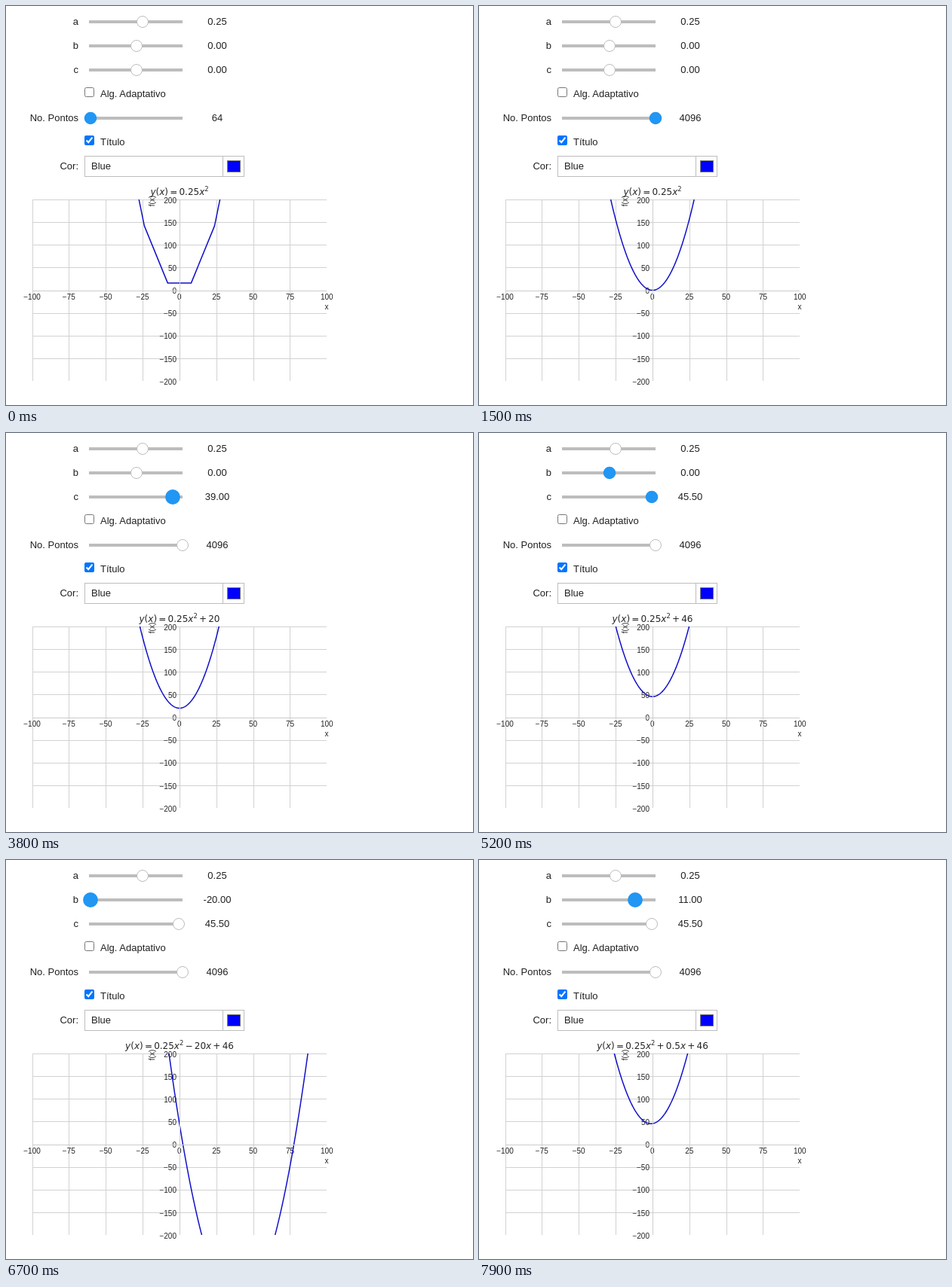
An HTML page for the animation above (8 s loop, 619x530 px).

```html
<!DOCTYPE html>
<html lang="pt">
<head>
<meta charset="utf-8">
<title>Parábola</title>
<style>
  html, body { margin: 0; width: 100%; height: 100%; overflow: hidden; background: #fff; }
  svg { position: absolute; left: 0; top: 0; }
  input { position: absolute; left: 104px; margin: 0; width: 13px; height: 13px; pointer-events: none; }
  .ui { font: 13px "Liberation Sans", Arial, sans-serif; fill: #212121; }
  .tick { font: 10px "Liberation Sans", Arial, sans-serif; fill: #262626; }
  .title { font: 12px "DejaVu Sans", sans-serif; fill: #262626; }
  .title .i { font-style: italic; }
  .end { text-anchor: end; }
  .mid { text-anchor: middle; }
  .rail { fill: #bdbdbd; }
  .knob { fill: #fff; stroke: #bdbdbd; }
  .knob.on { fill: #2196f3; stroke: #2196f3; stroke-width: 1.6; }
  .box { fill: none; stroke: #bdbdbd; }
  .grid { stroke: #d2d2d2; }
  .spine { stroke: #ccc; }
  .curve { fill: none; stroke: #1111c8; stroke-width: 1.5; stroke-linejoin: round; }
</style>
</head>
<body>
<input type="checkbox" tabindex="-1" style="top:108px">
<input type="checkbox" tabindex="-1" style="top:172px" checked>
<svg id="stage" width="619" height="530" viewBox="0 0 619 530">
  <clipPath id="plot"><rect x="35" y="257" width="390" height="241"/></clipPath>
</svg>
<script>
const LOOP = 8000, STEP = 100, LAG = 200, REDRAW = 300;
const svg = document.getElementById('stage');

function add(tag, attrs, text) {
  const el = document.createElementNS('http://www.w3.org/2000/svg', tag);
  for (const k in attrs) el.setAttribute(k, attrs[k]);
  if (text !== undefined) el.textContent = text;
  return svg.appendChild(el);
}
const label = (x, y, text, cls) => add('text', { x, y, class: cls }, text);

// Form controls
function slider(name, y, min, max, digits) {
  label(96, y + 4, name, 'ui end');
  add('rect', { x: 110, y: y - 2, width: 124, height: 4, class: 'rail' });
  const knob = add('circle', { cy: y });
  const value = label(280, y + 4, '', 'ui mid');
  return (v, focus, drag) => {
    knob.setAttribute('cx', Math.round(112 + 122 * (v - min) / (max - min)));
    knob.setAttribute('r', drag ? 9.1 : 7.5);
    knob.setAttribute('class', focus ? 'knob on' : 'knob');
    value.textContent = v.toFixed(digits);
  };
}
const setA = slider('a', 21, -2, 2, 2);
const setB = slider('b', 53, -20, 20, 2);
const setC = slider('c', 85, -50, 50, 2);
const setN = slider('No. Pontos', 149, 64, 4096, 0);
label(125, 121, 'Alg. Adaptativo', 'ui');
label(125, 185, 'Título', 'ui');
const hover = add('rect', { x: 104.5, y: 108.5, width: 12, height: 12, rx: 2, fill: 'none', stroke: '#4f4f4f' });
label(96, 217, 'Cor:', 'ui end');
add('rect', { x: 104.5, y: 199.5, width: 211, height: 27, class: 'box' });
add('path', { d: 'M287.5 199V227', class: 'box' });
label(113, 217, 'Blue', 'ui');
add('rect', { x: 293.5, y: 205.5, width: 17, height: 15, fill: '#00f', stroke: '#777' });

// Axes
const px = x => 229.9 + 1.954 * x;
const py = y => 377.6 - 0.603 * y;
const crisp = v => Math.round(v) + 0.5;
const minus = v => String(v).replace('-', '\u2212');
const vline = (x, cls) => add('path', { d: `M${crisp(px(x))} 257V498`, class: cls });
const hline = (y, cls) => add('path', { d: `M35 ${crisp(py(y))}H425`, class: cls });

for (let x = -100; x < 100; x += 25) vline(x, 'grid');
for (let y = -150; y <= 200; y += 50) hline(y, 'grid');
for (let x = -100; x <= 100; x += 25) label(px(x), 390, minus(x), 'tick mid');
for (let y = -200; y <= 200; y += 50) label(226, Math.round(py(y) + 4.5), minus(y), 'tick end');
label(425, 403, 'x', 'tick mid');
add('text', { transform: 'translate(197 259) rotate(-90)', class: 'tick mid' }, 'f(x)');
const curve = add('path', { class: 'curve', 'clip-path': 'url(#plot)' });
vline(0, 'spine');
hline(0, 'spine');
const title = label(230, 251, '', 'title mid');

function drawCurve(a, b, c, n) {
  const pts = [];
  for (let i = 0; i < n; i++) {
    const x = -500 + 1000 * i / (n - 1);
    if (Math.abs(x) < 125) pts.push(px(x).toFixed(2) + ' ' + py(a * x * x + b * x + c).toFixed(2));
  }
  curve.setAttribute('d', 'M' + pts.join('L'));
}

function drawTitle(a, b, c) {
  const it = (s, dx = 0) => `<tspan class="i" dx="${dx}">${s}</tspan>`;
  const op = s => `<tspan dx="2.2">${s}</tspan>`;
  const num = v => Number(Math.abs(v).toPrecision(2));
  const sign = v => op(v < 0 ? '\u2212' : '+');
  const linear = b && sign(b) + (Math.abs(b) === 1 ? it('x', 2.2) : op(num(b)) + it('x'));
  const constant = c && sign(c) + op(num(c));
  title.innerHTML = it('y') + '(' + it('x') + ')' + op('=') + op(num(a)) + it('x') +
    '<tspan dy="-5" font-size="8.4">2</tspan><tspan dy="5">\u200b</tspan>' +
    (linear || '') + (constant || '');
}

// Piecewise drag through [time, value] points, snapped to the slider's step
function drag(points, snap, t) {
  let [t0, v0] = points[0];
  for (const [t1, v1] of points) {
    if (t < t1) {
      const u = Math.max(0, (t - t0) / (t1 - t0));
      return Math.round((v0 + (v1 - v0) * u) / snap) * snap;
    }
    [t0, v0] = [t1, v1];
  }
  return v0;
}
const dragN = t => drag([[500, 64], [1200, 4096]], 64, t);
const dragC = t => drag([[3100, 0], [3600, 20], [3800, 39], [4300, 45.5]], 0.5, t);
const dragB = t => drag([[5400, 0], [5800, -13.5], [6300, -20], [6800, -20],
  [7100, -15], [7500, 0.5], [7700, 8.5], [7900, 11]], 0.5, t);
const within = (t, from, to) => t >= from && t < to;

let last = -1;
function render(t) {
  const a = 0.25;
  setA(a, false, false);
  setB(dragB(t), t >= 5200, t >= 5400);
  setC(dragC(t), within(t, 2900, 5400), within(t, 3100, 4400));
  setN(dragN(t), t < 3100, within(t, 500, 1500));
  hover.style.display = within(t, 2300, 2500) || within(t, 2600, 2700) ? '' : 'none';

  // The plot trails the sliders and redraws less often
  const p = Math.floor((t - LAG) / REDRAW) * REDRAW;
  drawCurve(a, dragB(p), dragC(p), dragN(p));
  drawTitle(a, dragB(p), dragC(p));
}

function tick() {
  const t = Math.floor(performance.now() % LOOP / STEP) * STEP;
  if (t !== last) render(last = t);
  requestAnimationFrame(tick);
}
tick();
</script>
</body>
</html>
```
